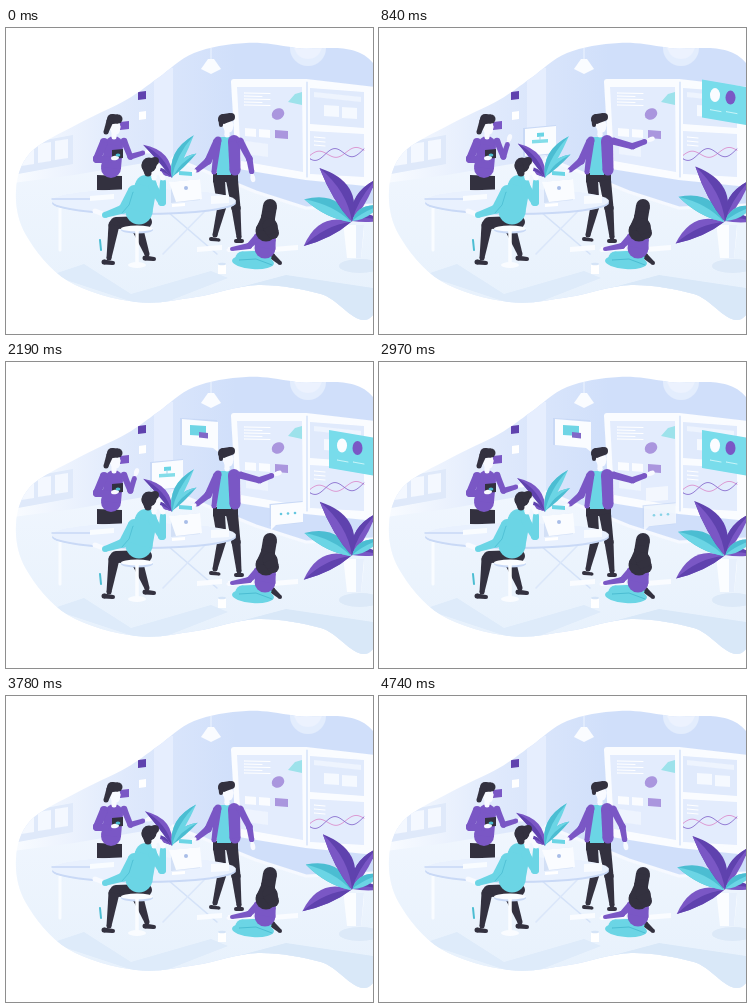
These frames come from a looping animation (367 px wide and 306 px high, 4.77 s). An HTML page with a canvas:

```html
<!DOCTYPE html>
<html lang="en">
<head>
<meta charset="utf-8">
<title>Team at work</title>
<style>
html, body { margin: 0; width: 100%; height: 100%; overflow: hidden; background: #fff; }
canvas { display: block; width: 367px; height: 306px; }
</style>
</head>
<body>
<canvas id="stage" width="367" height="306"></canvas>
<script>
const ctx = document.getElementById('stage').getContext('2d');
const LOOP = 4770, RAD = Math.PI / 180;
const PURPLE = '#7a57c5', DEEP = '#5f42ae', TEAL = '#6bd5e5', SEA = '#4bbdd2';
const DARK = '#33313f', SKIN = '#f8faff', WHITE = '#fafcff', EDGE = '#c9d9f6';

const clamp = v => Math.max(0, Math.min(1, v));
const mix = (a, b, k) => a + (b - a) * k;
const ease = k => k * k * (3 - 2 * k);
const span = (t, from, to) => ease(clamp((t - from) / (to - from)));
// Rises during the first interval and falls during the second.
const pulse = (t, a, b, c, d) => span(t, a, b) - span(t, c, d);

function trace(points) {
  ctx.beginPath();
  for (let i = 0; i < points.length; i += 2) ctx.lineTo(points[i], points[i + 1]);
}
function poly(color, ...points) {
  trace(points);
  ctx.fillStyle = color;
  ctx.fill();
}
function line(color, width, ...points) {
  trace(points);
  ctx.strokeStyle = color;
  ctx.lineWidth = width;
  ctx.lineCap = ctx.lineJoin = 'round';
  ctx.stroke();
}
// A box whose right side is shifted down by drop.
function slab(color, x, y, w, h, drop = 0) {
  poly(color, x, y, x + w, y + drop, x + w, y + h + drop, x, y + h);
}
function oval(color, x, y, rx, ry = rx, turn = 0) {
  ctx.fillStyle = color;
  ctx.beginPath();
  ctx.ellipse(x, y, rx, ry, turn * RAD, 0, 2 * Math.PI);
  ctx.fill();
}
// A tapered form with round ends, w0 wide at the start and w1 at the end.
function limb(color, x0, y0, w0, x1, y1, w1) {
  const d = Math.hypot(x1 - x0, y1 - y0) * 2, nx = (y0 - y1) / d, ny = (x1 - x0) / d;
  oval(color, x0, y0, w0 / 2);
  oval(color, x1, y1, w1 / 2);
  poly(color, x0 + nx * w0, y0 + ny * w0, x1 + nx * w1, y1 + ny * w1,
    x1 - nx * w1, y1 - ny * w1, x0 - nx * w0, y0 - ny * w0);
}
function leaf(x, y, angle, length, bend, width, color, shade, sway) {
  ctx.save();
  ctx.translate(x, y);
  ctx.rotate(angle * RAD + sway);
  const half = (a, b, fill) => {
    ctx.fillStyle = fill;
    ctx.beginPath();
    ctx.moveTo(0, 0);
    ctx.quadraticCurveTo(length * .45, a, length, 0);
    ctx.quadraticCurveTo(length * .45, b, 0, 0);
    ctx.fill();
  };
  half(bend - width, bend + width, color);
  half(bend - width, bend, shade);
  ctx.restore();
}
function arm(x, y, upper, fore, upperLen, foreLen, width) {
  const ex = x + upperLen * Math.cos(upper * RAD), ey = y + upperLen * Math.sin(upper * RAD);
  const c = Math.cos(fore * RAD), s = Math.sin(fore * RAD);
  const point = d => [ex + c * d, ey + s * d];
  line(SKIN, width * .45, ex, ey, ...point(foreLen));
  oval(SKIN, ...point(foreLen), 3.8, 2.4, fore);
  limb(PURPLE, x, y, width, ex, ey, width * .9);
  limb(PURPLE, ex, ey, width * .9, ...point(foreLen * .65), width * .75);
}
function group(draw, alpha, x = 0, y = 0, scale = 1, dy = 0) {
  if (alpha <= 0) return;
  ctx.save();
  ctx.globalAlpha = alpha;
  ctx.translate(x, y + dy);
  ctx.scale(scale, scale);
  ctx.translate(-x, -y);
  draw();
  ctx.restore();
}

// Smooth outline of the scene through a few key points.
function outline() {
  const keys = [[240, 15], [290, 20], [367, 35], [400, 160], [367, 287], [315, 266], [252, 257],
    [190, 269], [130, 274], [62, 253], [20, 207], [10, 163], [24, 125], [70, 97], [120, 72], [152, 50], [188, 25]];
  const path = new Path2D(), n = keys.length, at = i => keys[(i + n) % n];
  path.moveTo(...keys[0]);
  keys.forEach((b, i) => {
    const a = at(i - 1), c = at(i + 1), d = at(i + 2);
    path.bezierCurveTo(b[0] + (c[0] - a[0]) / 6, b[1] + (c[1] - a[1]) / 6,
      c[0] - (d[0] - b[0]) / 6, c[1] - (d[1] - b[1]) / 6, ...c);
  });
  return path;
}
const scene = outline();

function room() {
  const wall = ctx.createLinearGradient(10, 60, 230, 60);
  ['#f8fbff', '#dfe9fc', '#d0dffa'].forEach((c, i) => wall.addColorStop(i / 2, c));
  ctx.fillStyle = wall;
  ctx.fillRect(0, 0, 367, 306);
  slab('#e6eefe', 148, 40, 19, 92);

  const floor = ctx.createLinearGradient(0, 130, 0, 280);
  floor.addColorStop(0, '#f0f6fe');
  floor.addColorStop(1, '#e7f1fc');
  poly(floor, 0, 156, 68, 147, 167, 130, 250, 164, 300, 180, 367, 177, 367, 306, 0, 306);
  line('#f6f9ff', 3, 167, 130, 250, 164, 300, 180, 367, 177);

  slab('#dfe9fa', 12, 117, 55, 29, -10);
  for (let i = 0; i < 3; i++) slab('#f4f8ff', 15 + i * 17, 119 - i * 3, 13, 19, -2);
  poly('#deebfa', 45, 247, 78, 236, 125, 266, 205, 243, 222, 250, 145, 280);
  poly('#d9e8f8', 205, 267, 280, 247, 367, 260, 367, 300);
  oval('#dce9f8', 354, 238, 21, 7);

  oval('#e3edfd', 302, 20, 18);
  oval('#ecf2fe', 302, 17, 14);
  line('#edf4ff', 1, 205, 15, 205, 33);
  poly(WHITE, 202, 31, 208, 31, 215, 41, 205, 46, 195, 41);
  slab(DEEP, 132, 64, 8, 8, -1);
  slab('#fff', 133, 84, 7, 8, -1);
  slab(PURPLE, 114, 94, 9, 8, -1);
}

function board() {
  const frame = [228, 54, 300, 54, 370, 62, 370, 156, 300, 149, 233, 138];
  poly(WHITE, ...frame, 228, 54);
  line(WHITE, 6, ...frame, 228, 54);
  poly('#e3ecfd', 231, 59, 296, 59, 297, 144, 235, 133);
  slab('#e0eafc', 304, 60, 54, 36, 4);
  slab('#e3ecfd', 304, 103, 54, 43, 3);
  line('#cbdcf8', 1.2, 301, 54, 301, 149);
  for (let i = 0; i < 5; i++) line('#fff', 1, 238, 65 + i * 3, i % 2 ? 256 : 264, 65.5 + i * 3);
  poly('#9de2eb', 282, 74, 289, 66, 296, 64, 296, 77);
  oval('#aa96de', 272, 86, 6.5, 5.5, -30);
  for (let i = 0; i < 2; i++) slab(WHITE, 239 + i * 14, 100 + i, 11, 8, 1);
  slab('#aa96de', 269, 102, 13, 8, 1);
  slab('#eef4fe', 240, 113, 22, 13, 3);
  slab('#eef4fe', 308, 64, 47, 5, 5);
  for (let i = 0; i < 2; i++) slab('#f5f9ff', 318 + i * 18, 77 + i * 2, 15, 11, 1);
  for (let i = 0; i < 3; i++) line('#fff', 1, 308, 109 + i * 4, 319, 110 + i * 4);
  const wave = (color, height, phase) => {
    const points = [];
    for (let x = 0; x <= 54; x += 2) points.push(304 + x, 128 - x * .1 + height * Math.sin(x * .17 + phase));
    line(color, .9, ...points);
  };
  wave('#dc91cf', 4, 3.3);
  wave('#8b70d0', 5, .6);
}

function slidingPanel(t) {
  const drop = pulse(t, 720, 1240, 3300, 3720);
  const alpha = pulse(t, 600, 780, 3420, 3720);
  group(() => {
    slab('#78dceb', 323, 68, 47, 38, 8);
    oval(WHITE, 336, 83.5, 5, 7);
    oval(PURPLE, 351.5, 86, 5, 7);
    for (let i = 0; i < 2; i++) line('#c8f4f8', 1, 331 + i * 16, 98 + i * 2, 342 + i * 16, 100 + i * 2);
  }, alpha, 0, 0, 1, -19 * (1 - drop));
}

function cards(t) {
  const popUp = (k, x, y, draw) => group(draw, clamp(k * 1.5), x, y, mix(.8, 1, k));

  popUp(pulse(t, 90, 570, 2430, 2940), 162, 114, () => {
    slab(EDGE, 144, 100, 33, 29, -3);
    slab(WHITE, 146, 101, 31, 27, -3);
    slab(TEAL, 158, 105, 7, 4, -.5);
    slab('#83dde9', 153, 112, 16, 3.5, -1);
    line('#9fd6ec', 1, 161, 108, 161, 112);
  });
  popUp(pulse(t, 1680, 2130, 3270, 3720), 194, 72, () => {
    slab(EDGE, 174, 56, 37, 27, 2);
    poly(WHITE, 176, 57, 212, 60, 212, 90, 207, 86, 176, 83);
    slab('#6fd5e5', 184, 63, 16, 10, 1);
    slab('#8168c8', 193, 70, 9, 5.5, 1);
  });

  const enter = span(t, 1140, 1500), exit = span(t, 2850, 3210);
  group(() => slab(WHITE, 267, 126, 22, 14, -2), .9 * Math.sin(exit * Math.PI));
  group(() => {
    slab(EDGE, 263.5, 142, 33, 22, -3);
    poly(WHITE, 265, 143, 297, 140, 297, 160, 270, 163, 265, 168);
    for (let i = 0; i < 3; i++) oval('#65c7df', 275 + i * 7, 152 - i * .5, 1.3);
  }, enter * (1 - exit), 0, 0, 1, mix(6, 0, enter) + exit * 5);
}

function smallPlant(sway) {
  const a = sway * .06;
  leaf(165, 149, -162, 24, 5, 6, DEEP, PURPLE, a);
  leaf(166, 149, -44, 34, -5, 7, SEA, TEAL, a);
  leaf(166, 150, -131, 44, 10, 9, PURPLE, DEEP, a);
  leaf(166, 150, -63, 48, -7, 10, TEAL, SEA, a);
}

function bigPlant(sway) {
  const a = sway * .065;
  slab('#fbfdff', 338, 197, 20, 6);
  poly('#fbfdff', 338, 203, 358, 203, 355, 230, 341, 230);
  poly('#e6effc', 350, 197, 358, 197, 355, 230, 350, 230);
  leaf(346, 193, 0, 28, -6, 8, PURPLE, DEEP, a * .5);
  leaf(346, 193, -60, 48, -6, 11, PURPLE, DEEP, a * .5);
  leaf(346, 193, -29, 32, -3, 10, TEAL, SEA, a * .5);
  leaf(345, 194, 153, 53, 9, 15, PURPLE, DEEP, a);
  leaf(345, 194, -154, 52, 8, 16, SEA, TEAL, a);
  leaf(346, 194, -121, 63, 12, 18, DEEP, PURPLE, a);
}

function head(x, y) {
  limb(SKIN, x, y, 11, x + .5, y + 3, 9);
  limb(SKIN, x - 1, y + 4, 5, x - 1, y + 10, 5);
}

function standingWoman(t) {
  slab(DARK, 91, 147, 25, 15, 1);
  limb(PURPLE, 108, 117, 18, 105, 140, 20);
  arm(118, 113, 68, mix(-17, -72, pulse(t, 60, 630, 2370, 2940)), 17, 20, 6.4);
  limb(PURPLE, 98, 114, 8, 91, 131, 8);
  limb(PURPLE, 91, 131, 8, 103, 132, 6);
  slab(DARK, 106, 122, 11, 9, -1);
  oval(SKIN, 109, 130, 4, 2.2, -10);
  oval(SEA, 112, 127, 2.4, 1.5);
  head(109, 99);
  limb(DARK, 106, 91, 10, 112, 91, 9);
  limb(DARK, 104, 93, 7, 100, 104, 5);
}

function standingMan(t) {
  slab(DARK, 207, 145, 25, 9);
  limb(DARK, 213, 152, 12, 216, 178, 9);
  limb(DARK, 216, 178, 9, 209, 207, 5);
  limb(DARK, 226, 152, 12, 230, 180, 9);
  limb(DARK, 230, 180, 9, 233, 209, 5);
  limb(DARK, 205, 211, 4, 213, 212, 3);
  limb(DARK, 230, 213, 4, 236, 213, 4);
  slab(TEAL, 211, 109, 14, 38);
  limb(PURPLE, 212, 112, 7, 208, 144, 5);
  limb(PURPLE, 228, 113, 12, 229, 142, 11);
  limb(PURPLE, 211, 114, 8, 202, 133, 7);
  limb(PURPLE, 202, 133, 7, 191, 142, 5);
  line(SKIN, 3.2, 189, 143, 182, 146);
  slab(TEAL, 173, 143, 13, 4, 1);
  const raise = pulse(t, 180, 750, 3240, 3690);
  arm(234, 113, mix(62, 15, raise), mix(80, -20, raise), 20, 20, 7);
  head(222, 97);
  limb(DARK, 217, 91, 10, 225, 89, 8);
  limb(DARK, 215, 92, 5, 215, 97, 4);
}

function table() {
  line('#f9fcff', 3, 54, 173, 54, 222);
  line('#d4e2f8', 1.6, 162, 184, 211, 226);
  line('#dbe7fa', 1.6, 201, 181, 157, 226);
  oval(EDGE, 138, 175, 92, 12);
  oval('#e9f1fe', 138, 173, 92, 12);
  line(EDGE, 1.5, 46, 171, 92, 171);
  slab('#f9fcff', 84, 168, 24, 5, -2);
  slab('#f8fbff', 205, 168, 18, 8, -1);
  slab('#d3e0f6', 165, 154, 29, 21, -3);
  poly(WHITE, 163, 154, 194, 151, 196, 171, 170, 174);
  oval('#a8bde8', 180, 160, 2);
  slab('#fff', 166, 176, 13, 3, -1);
}

function seatedMan() {
  limb(DARK, 140, 194, 12, 110, 195, 12);
  limb(DARK, 108, 197, 11, 103, 230, 5);
  limb(DARK, 132, 202, 11, 141, 226, 5);
  limb(DARK, 98, 234, 5, 107, 235, 4);
  limb(DARK, 139, 230, 5, 148, 231, 4);
  oval(EDGE, 131, 202, 16, 3.5);
  oval(WHITE, 131, 200.5, 16, 3);
  line(WHITE, 3.5, 131, 203, 131, 235);
  oval(WHITE, 131, 237, 9, 3);
  line(SEA, 2, 94, 212, 95, 222);
  limb(SKIN, 97, 186, 5, 89, 183, 5);
  limb(TEAL, 128, 163, 12, 117, 181, 9);
  limb(TEAL, 117, 181, 9, 99, 187, 6);
  limb(TEAL, 140, 158, 22, 133, 183, 27);
  limb(TEAL, 147, 159, 9, 156, 174, 8);
  limb(TEAL, 156, 174, 8, 157, 154, 6);
  limb(SKIN, 157, 150, 5, 154, 145, 4);
  line(SEA, .8, 127, 164, 123, 177, 116, 185);
  head(149, 140);
  limb(DARK, 143, 137, 15, 149, 133, 8);
  limb(DARK, 140, 138, 9, 142, 145, 7);
}

function sittingWoman() {
  for (const x of [191, 222, 267]) slab(WHITE, x, 219, 25, 5, -2);
  slab('#fff', 212, 236, 8, 10);
  oval('#d5e4f7', 216, 236, 4, 1.3);
  limb(DARK, 266, 228, 6, 274, 235, 4);
  limb(TEAL, 259, 229, 13, 236, 230, 13);
  oval(TEAL, 247, 234, 21, 7, 4);
  line(SEA, 1, 233, 232, 250, 231, 266, 237);
  line(SKIN, 3, 229, 221, 222, 222);
  limb(PURPLE, 252, 209, 8, 243, 218, 6);
  limb(PURPLE, 243, 218, 6, 226, 221, 4);
  limb(PURPLE, 261, 210, 18, 259, 220, 21);
  limb(DARK, 264, 178, 14, 262, 190, 14);
  limb(DARK, 262, 190, 14, 260, 203, 21);
  limb(DARK, 264, 198, 15, 267, 205, 12);
}

function draw(t) {
  const sway = (1 - Math.cos(4 * Math.PI * t / LOOP)) / 2;
  ctx.fillStyle = '#fff';
  ctx.fillRect(0, 0, 367, 306);
  ctx.save();
  ctx.clip(scene);
  room();
  board();
  slidingPanel(t);
  ctx.restore();
  cards(t);
  standingWoman(t);
  smallPlant(sway);
  standingMan(t);
  table();
  seatedMan();
  sittingWoman();
  bigPlant(sway);
}

const start = performance.now();
function tick() {
  draw((performance.now() - start) % LOOP);
  requestAnimationFrame(tick);
}
tick();
</script>
</body>
</html>
```
